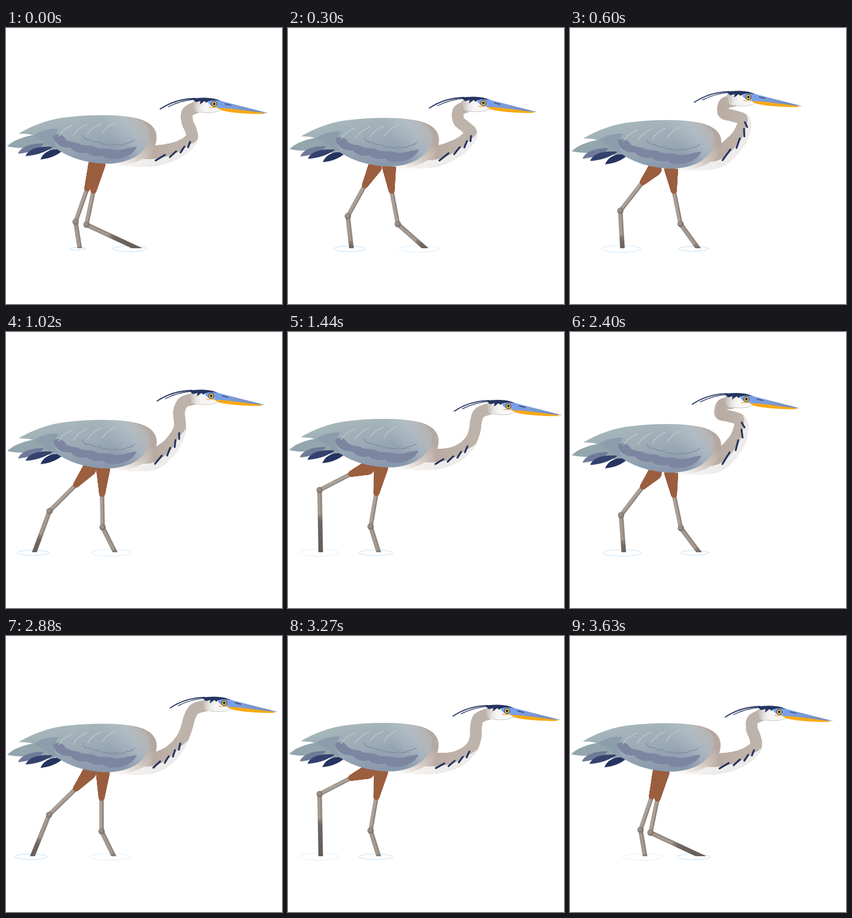
Recreate the animation shown at these times as an HTML page with a canvas. Size 480x480 px, loop 3.66 s.

```html
<!DOCTYPE html>
<html>
<head>
<meta charset="utf-8">
<style>
  html, body { margin: 0; width: 100%; height: 100%; overflow: hidden; background: #fff; }
  canvas { display: block; }
</style>
</head>
<body>
<canvas id="stage" width="480" height="480"></canvas>
<script>
const ctx = document.getElementById('stage').getContext('2d');
const LOOP = 3660, STRIDE = LOOP / 2, FRAME = 30, WATER = 383;
const NAVY = '#25345f';

// Poses of one leg: time, knee x, y, ankle x, y, shin angle from vertical in degrees
const LEG = [
  [0, 152, 284, 140, 342, 65],      // reaching out
  [150, 180, 284, 190, 341, 55],
  [590, 181, 284, 193, 341, 36],    // planted
  [1830, 141, 280, 121, 337, 9],
  [2415, 126, 269, 88, 318, 4],
  [2880, 121, 266, 75, 311, -22],   // pushing off
  [3270, 109, 247, 55, 275, 1],     // lifted
  [3630, 152, 284, 140, 342, 65]
];
// Neck spines from head to chest, folded and stretched
const FOLDED = [[280,126],[265,130],[263,146],[278,150],[298,156],[301,170],[289,196],[255,225]];
const STRETCHED = [[352,131],[331,138],[324,152],[321,169],[314,187],[300,203],[280,215],[250,221]];

const mix = (a, b, k) => a + (b - a) * k;
const clamp = (v, a, b) => Math.min(b, Math.max(a, v));
const smooth = u => u * u * (3 - 2 * u);
// Bump that peaks once per stride
const pulse = (t, peak, power) => (0.5 + 0.5 * Math.cos(2 * Math.PI * (t - peak) / STRIDE)) ** power;

function headAt(time) {
  // The second stride runs a little ahead of the first
  const t = time - 60 * Math.sin(2 * Math.PI * time / LOOP);
  const back = 585, rise = 635, u = ((t - back) % STRIDE + STRIDE) % STRIDE;
  const reach = u < rise ? smooth(u / rise) : 1 - ((u - rise) / (STRIDE - rise)) ** 1.8;
  return [306 + 80 * reach, 132 - 22 * pulse(t, 870, 1.9)];
}

function legAt(time) {
  const t = time % LOOP;
  const i = LEG.findLastIndex(pose => pose[0] <= t), a = LEG[i];
  const b = LEG[i + 1] || [LOOP, ...LEG[0].slice(1)];
  return a.map((v, c) => mix(v, b[c], (t - a[0]) / (b[0] - a[0]))).slice(1);
}

function gradient(x0, y0, x1, y1, ...stops) {
  const g = ctx.createLinearGradient(x0, y0, x1, y1);
  stops.forEach(([at, color]) => g.addColorStop(at, color));
  return g;
}
function fill(d, color) {
  ctx.fillStyle = color;
  ctx.fill(new Path2D(d));
}
function stroke(d, color, width) {
  ctx.strokeStyle = color;
  ctx.lineWidth = width;
  ctx.stroke(new Path2D(d));
}
function line(x0, y0, x1, y1, color, width) {
  stroke(`M${x0},${y0}L${x1},${y1}`, color, width);
}
function disc(x, y, r, color) {
  ctx.fillStyle = color;
  ctx.beginPath();
  ctx.arc(x, y, r, 0, 7);
  ctx.fill();
}

function drawRipple(x, u) {
  const r = 14 + 21 * (1 - (1 - u) ** 2);
  ctx.globalAlpha = 1 - 0.6 * u ** 4;
  ctx.strokeStyle = '#b5daf7';
  ctx.lineWidth = 0.9;
  ctx.beginPath();
  ctx.ellipse(x, 384, r, r * 0.17, 0, 0, 7);
  ctx.stroke();
  ctx.globalAlpha = 1;
}

function drawLeg(t, drop, side) {
  const [kx, ky, ax, ay, deg] = legAt(t + side * STRIDE);
  const angle = deg * Math.PI / 180, sin = Math.sin(angle), cos = Math.cos(angle);
  const footX = ax + (WATER - ay) * Math.tan(angle);
  drawRipple(footX - 2 - Math.max(0, deg) / 6, (t / (LOOP / 5) + (1 - side) / 2) % 1);

  ctx.save();
  ctx.beginPath();
  ctx.rect(0, 0, 480, WATER);
  ctx.clip();
  line(kx, ky, ax, ay, '#8b8079', 7.5);
  line(kx - 1, ky, ax - 1, ay, '#aba097', 5);
  const ex = ax + 130 * sin, ey = ay + 130 * cos;
  line(ax, ay, ex, ey, gradient(ax, ay, ex, ey,
    [0, '#94897f'], [0.32, '#94897f'], [0.42, '#6f6560'], [1, '#615854']), 8);
  line(ax - 1, ay, ax - 1 + 42 * sin, ay + 42 * cos, '#a69b92', 4);
  disc(ax, ay, 5.5, '#81766f');
  disc(ax - 1, ay - 1, 3.5, '#9b9087');
  ctx.restore();

  const hx = 160 + 0.52 * (kx - 150), hy = 237 + drop;
  for (let k = 0; k <= 1; k += 0.02)
    disc(mix(hx, kx, k), mix(hy, ky, k), mix(12, 5, k), '#9b5f40');
}

function neckSpine(ex, ey, drop) {
  const reach = (ex - 306) / 75, sink = ey - mix(119, 127, reach);
  const bow = clamp(sink / 7, -0.5, 1);
  const spine = FOLDED.map((p, j) => {
    const q = STRETCHED[j];
    return [
      mix(p[0], q[0], reach) + 13 * bow * Math.sin(Math.PI * j / 8) ** 2,
      mix(p[1], q[1], reach) + sink * (1 - j / 7) + 9 * bow * Math.sin(Math.PI * j / 7)
    ];
  });
  return [...spine, [200, 218 + drop]];
}

function drawNeck(spine) {
  const at = s => {
    const i = Math.min(7, Math.floor(s)), u = s - i;
    const p = j => spine[clamp(i + j, 0, 8)];
    return [0, 1].map(c => {
      const [a, b, d, e] = [p(-1)[c], p(0)[c], p(1)[c], p(2)[c]];
      return b + u / 2 * (d - a + u * (2 * a - 5 * b + 4 * d - e + u * (3 * (b - d) + e - a)));
    });
  };
  const radius = s => 10 + 12 * Math.max(0, (s - 3.5) / 4.5) ** 1.5;
  // Point moved towards the throat side by a share of the radius
  const offset = (s, share) => {
    const [x, y] = at(s), a = at(Math.max(0, s - 0.05)), b = at(Math.min(8, s + 0.05));
    const dx = b[0] - a[0], dy = b[1] - a[1], l = Math.hypot(dx, dy) || 1, d = share * radius(s);
    return [x + dy / l * d, y - dx / l * d];
  };

  const skin = gradient(195, 0, 300, 0,
    [0, '#faf9f8'], [0.35, '#d9d0ca'], [0.6, '#b9aba2'], [1, '#beb3aa']);
  for (let s = 0; s <= 8; s += 0.04) disc(...at(s), radius(s), skin);
  const chest = gradient(195, 0, 260, 0, [0, '#f8f7f6'], [1, '#eeeceb']);
  for (let s = 3.9; s <= 8; s += 0.04) {
    const share = 0.34 * clamp((s - 3.9) / 0.9, 0, 1);
    disc(...offset(s, 1 - share), share * radius(s), chest);
  }
  for (let s = 4.7; s < 6.9; s += 0.65)
    line(...offset(s - 0.24, 0.12), ...offset(s + 0.2, 0.5), NAVY, 3.2);
}

function drawBody() {
  fill('M2,206C12,196 30,189 50,186L100,200L80,214C56,206 26,212 2,206Z', '#93a6ad');
  fill('M21,219C24,209 40,200 66,201L56,212C42,215 32,218 21,219Z', '#707b99');
  fill('M34,223C38,212 52,205 82,207C68,217 50,222 34,223Z', '#35426d');
  fill('M60,229C64,217 78,208 100,212C90,222 76,227 60,229Z', NAVY);
  // Shoulder rim behind the wing
  fill('M200,154C235,155 262,166 262,190C262,212 245,232 205,239L180,236Z',
    gradient(200, 238, 250, 190, [0, '#f6f4f3'], [0.5, '#d3c9c2'], [1, '#b5a8a0']));
  const wing = 'M22,184C45,170 75,158 110,155C160,150 212,150 236,162C254,172 254,190 245,204'
    + 'C234,222 215,233 185,236C150,238 115,228 92,213C80,206 68,194 48,187C38,184 30,184 22,184Z';
  fill(wing, gradient(130, 152, 145, 236, [0, '#a6b6ba'], [0.45, '#9cabb6'], [1, '#8998ac']));
  fill(wing, gradient(190, 205, 252, 168, [0, '#c0cacf00'], [0.5, '#c0cacf80'], [1, '#b9ada6']));
  fill('M48,187C62,178 78,174 92,176C82,186 82,200 92,213C78,208 66,196 48,187Z', '#8c9eac');
  fill('M82,188C90,182 100,186 104,194C112,200 124,198 130,203C140,206 150,203 156,208'
    + 'C168,212 178,208 186,212C200,215 214,207 227,207C222,220 205,228 190,228'
    + 'C182,230 174,228 168,222C160,226 146,222 140,217C130,220 116,215 112,208C98,210 84,202 82,188Z', '#7d86a0');
  stroke('M132,186q4,10 14,8q6,6 16,4q6,6 14,4q8,5 16,0q10,4 18,-2q8,0 14,-6', '#7c8aa2', 1.2);
  for (let x = 92; x < 170; x += 25)
    stroke(`M${x},${194 - x / 16}q8,-13 24,-19`, '#b9c7cb', 1.6);
}

function drawHead() {
  fill('M-38,-3C-30,-11 -12,-11 10,-5L14,3C12,10 6,14 -6,15C-14,16 -28,16 -34,12Z',
    gradient(-38, 0, -16, 0, [0, '#bfb4ab'], [0.6, '#ebe8e6'], [1, '#f7f6f6']));
  stroke('M-24,14C-10,17 4,15 11,11', '#cbc5c2', 1);
  stroke('M-94,9C-76,-3 -58,-9 -34,-9.5', NAVY, 1.8);
  stroke('M-80,5C-64,-3 -50,-7 -32,-8', NAVY, 1.3);
  fill('M-38,-9C-28,-11 -8,-12 4,-8C12,-5 18,-3 14,-2C4,-6 -4,-7 -11,-4L-14,-2L-17,-5L-25,1L-24,-5L-32,-3Z', NAVY);
  fill('M-11,-3C-4,-8 8,-6 16,-4L94,16C60,14 36,10 14,8C4,6 -4,8 -11,-3Z',
    gradient(0, 0, 94, 0, [0, '#76a0f0'], [0.4, '#7b9bd8'], [1, '#7286b0']));
  fill('M5,7C24,7 50,11 88,16L87,17.5C60,18 24,15 12,11Z', '#f9a914');
  stroke('M-8,6C-3,7 2,6 6,5', '#f2b544', 1.6);
  stroke('M19,0L29,2.5', '#3a4d80', 1.6);
  disc(0, 0, 5, '#2a3350');
  disc(0, 0, 4, '#f2c341');
  disc(0, 0, 2.1, '#15182a');
}

function drawAt(x, y, part) {
  ctx.save();
  ctx.translate(x, y);
  part();
  ctx.restore();
}

function draw(now) {
  const t = Math.floor(now % LOOP / FRAME) * FRAME;
  const drop = 9 * pulse(t, 570, 2.4) - 0.8, [ex, ey] = headAt(t);
  ctx.clearRect(0, 0, 480, 480);
  ctx.lineCap = 'round';
  drawLeg(t, drop, 1);
  drawLeg(t, drop, 0);
  drawNeck(neckSpine(ex, ey, drop));
  drawAt(drop / 7, drop, drawBody);
  drawAt(ex, ey, drawHead);
}

let start;
function tick(now) {
  start ??= now;
  draw(now - start);
  requestAnimationFrame(tick);
}
requestAnimationFrame(tick);
</script>
</body>
</html>
```
